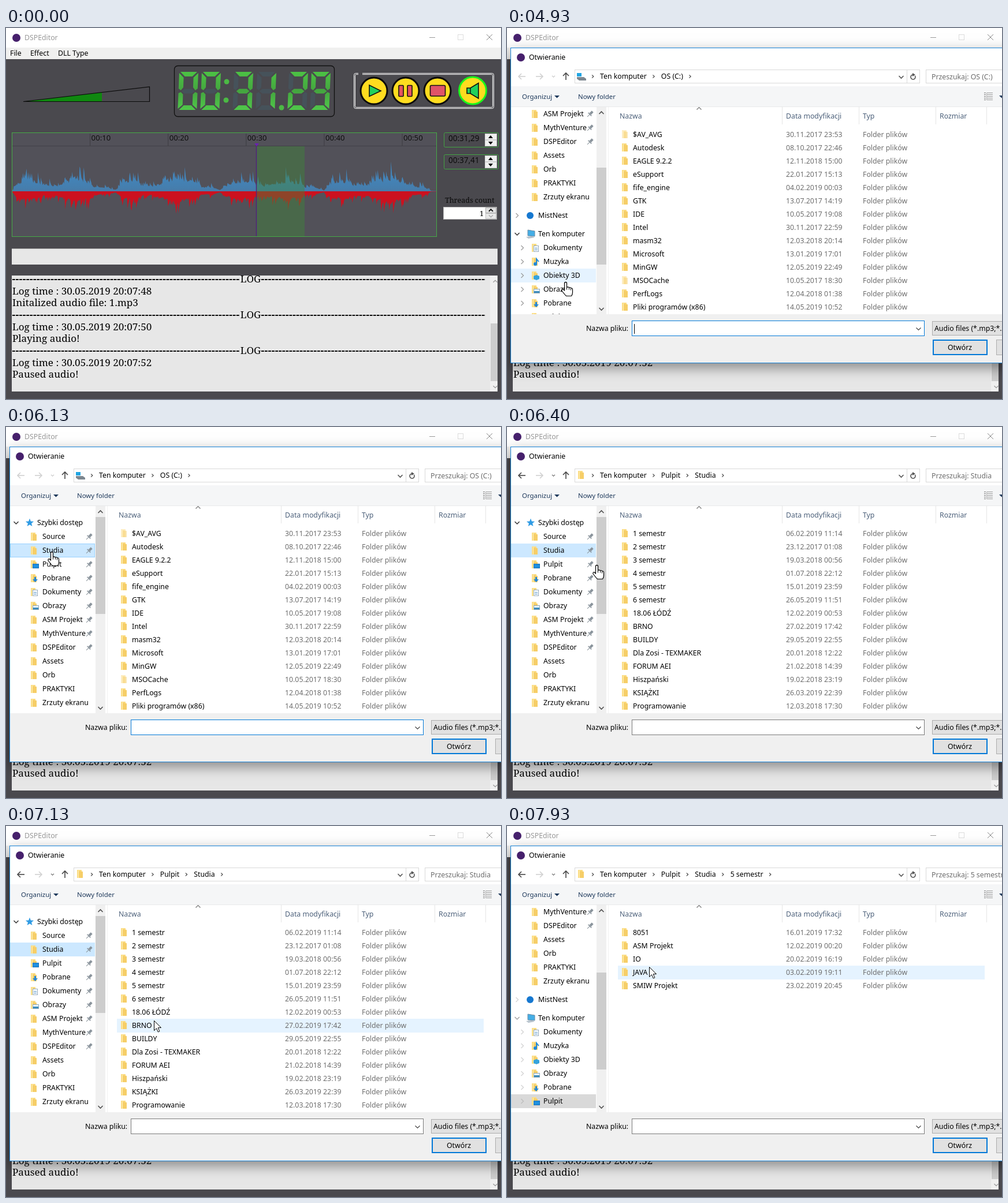
Animation, 857 px wide and 643 px high, one loop 8 s. Source, as an HTML page with a canvas:

```html
<!DOCTYPE html>
<html lang="pl">
<head>
<meta charset="utf-8">
<title>DSPEditor</title>
<style>
html, body { margin: 0; width: 100%; height: 100%; overflow: hidden; background: #4a494e; }
canvas { display: block; }
</style>
</head>
<body>
<canvas id="stage" width="857" height="643"></canvas>
<script>
const c = document.getElementById('stage').getContext('2d');
const SANS = '"Noto Sans", sans-serif', SERIF = '"Noto Serif", serif';
const BG = '#4a494e';

// ---------- helpers ----------
function rect(x, y, w, h, fill, stroke, lw = 1) {
  if (fill) { c.fillStyle = fill; c.fillRect(x, y, w, h); }
  if (stroke) {
    c.strokeStyle = stroke; c.lineWidth = lw;
    c.strokeRect(x + lw / 2, y + lw / 2, w - lw, h - lw);
  }
}
function rounded(x, y, w, h, r, fill, stroke, lw = 1) {
  c.beginPath(); c.roundRect(x, y, w, h, r);
  paint(fill, stroke, lw);
}
function paint(fill, stroke, lw = 1) {
  if (fill) { c.fillStyle = fill; c.fill(); }
  if (stroke) { c.strokeStyle = stroke; c.lineWidth = lw; c.stroke(); }
}
function poly(pts, fill, stroke, lw, open) {
  c.beginPath();
  for (let i = 0; i < pts.length; i += 2) c.lineTo(pts[i], pts[i + 1]);
  if (!open) c.closePath();
  paint(fill, stroke, lw);
}
const line = (pts, color, lw = 1) => poly(pts, null, color, lw, true);
function disc(x, y, r, fill, stroke, lw) {
  c.beginPath(); c.arc(x, y, r, 0, 7);
  paint(fill, stroke, lw);
}
// y is the middle of the capitals
function text(s, x, y, color = '#000', size = 12.3, family = SANS, align = 'left', weight = 400) {
  c.font = `${weight} ${size}px ${family}`;
  c.textAlign = align; c.fillStyle = color;
  c.fillText(s, x, Math.round(y + size * .36));
}
const logText = (s, x, y, align) => text(s, x, y, '#000', 17.1, SERIF, align, 500);
function chevron(x, y, dir, r, color, lw = 1.2) {
  c.save(); c.translate(x, y); c.rotate('rdlu'.indexOf(dir) * Math.PI / 2);
  line([-r / 2, -r, r / 2, 0, -r / 2, r], color, lw);
  c.restore();
}
function clip(x, y, w, h, draw) {
  c.save(); c.beginPath(); c.rect(x, y, w, h); c.clip();
  draw(); c.restore();
}

// ---------- main window ----------
const SEGMENTS = [
  [2, 0, 31, 0, 23, 8, 10, 8], [33, 2, 33, 29, 29, 32, 25, 27, 25, 10],
  [33, 37, 33, 64, 25, 57, 25, 39, 29, 35], [2, 66, 31, 66, 23, 58, 10, 58],
  [0, 37, 0, 64, 8, 57, 8, 39, 4, 35], [0, 2, 0, 29, 4, 32, 8, 27, 8, 10],
  [5, 33.5, 10, 29.5, 23, 29.5, 28, 33.5, 23, 37.5, 10, 37.5]
];
const LIT = { 0: '012345', 1: '12', 2: '01346', 3: '01236', 9: '012356' };

function digit(n, x) {
  c.save(); c.transform(1, 0, -.04, 1, x + 1, 76);
  SEGMENTS.forEach((s, i) => poly(s, LIT[n].includes(i) ? green : '#46525a'));
  c.restore();
}
const green = c.createLinearGradient(0, 0, 0, 66);
green.addColorStop(0, '#4cc244'); green.addColorStop(.5, '#44a53f'); green.addColorStop(1, '#50c84a');

// waveform envelope: x, height
const ENVELOPE = [11, 8, 20, 40, 50, 40, 65, 23, 92, 26, 108, 46, 122, 51, 145, 38, 152, 20,
  178, 15, 190, 4, 202, 38, 228, 42, 236, 22, 256, 22, 275, 44, 292, 50, 325, 40, 338, 19,
  358, 17, 370, 6, 380, 26, 396, 40, 426, 38, 440, 22, 465, 36, 488, 45, 508, 36, 518, 18,
  536, 18, 550, 4, 560, 32, 588, 43, 602, 24, 625, 28, 640, 44, 670, 53, 690, 42, 700, 22,
  724, 19, 736, 1, 746, 1];
let seed = 11;
const random = () => (seed = seed * 16807 % 2147483647) / 2147483647;
function envelope(x) {
  let i = 0;
  while (ENVELOPE[i + 2] < x) i += 2;
  const [x0, h0, x1, h1] = ENVELOPE.slice(i, i + 4);
  return h0 + (h1 - h0) * (x - x0) / (x1 - x0);
}
// a steady body with sparse spikes that fall off quickly
function wave(sign, scale) {
  const p = new Path2D();
  let spike = 0;
  p.moveTo(11, 283);
  for (let x = 11; x < 745; x++) {
    spike = Math.max(spike * .6, random() ** 6);
    const h = envelope(x) * scale * (.28 + .1 * random() + .62 * spike);
    p.lineTo(x + .5, 283 - sign * Math.max(h, .5));
  }
  p.lineTo(745, 283);
  return p;
}
const upper = wave(1, 1), lower = wave(-1, .85);

function spinner(y, value) {
  rounded(758.5, y + .5, 94, 25, 2, null, '#43a443');
  text(value, 766, y + 10.5, '#0c0c0c', 13.5);
  rect(829, y + 2, 21, 11, '#f0f0f0', '#cfcfcf');
  rect(829, y + 13, 21, 11, '#f0f0f0', '#cfcfcf');
  poly([835, y + 10, 843, y + 10, 839, y + 5], '#000');
  poly([835, y + 16, 843, y + 16, 839, y + 21], '#000');
}

function mainWindow() {
  rect(0, 0, 857, 643, BG);
  rect(0, 0, 857, 34, '#fff');
  rect(0, 34, 857, 20, '#f0f0ef');
  disc(18, 17, 7, '#46206c');
  text('DSPEditor', 32, 17, '#999');
  line([733, 16.5, 743, 16.5], '#999');
  rect(782, 11, 10, 10, null, '#ddd');
  line([832, 11, 842, 21], '#888'); line([842, 11, 832, 21], '#888');
  text('File', 7, 44); text('Effect', 42, 44); text('DLL Type', 90, 44);

  // volume
  poly([30, 127.5, 166, 111.5, 166, 127.5], '#108810');
  poly([30, 127.5, 248.5, 102, 248.5, 127.5], null, '#0a0a0a', 1.2);

  // clock
  rounded(291.5, 65.5, 277, 88, 6, null, '#101010', 1.3);
  [[0, 299], [0, 338], [3, 394], [1, 434], [2, 489], [9, 528]].forEach(d => digit(...d));
  for (const [x, y] of [[382, 93], [381, 125], [477, 138]]) disc(x, y, 4.5, '#4bb944');

  // transport buttons
  rounded(602.5, 78.5, 242, 61, 3, null, '#fff');
  rounded(604.5, 80.5, 238, 57, 2, null, '#fff');
  rect(610, 78, 7, 4, BG);
  for (const x of [637, 692, 747]) disc(x, 109, 23, '#ffdc1f', '#0b0b0b', 3);
  disc(808, 108.5, 23.5, '#ffdc1f', '#1bf51b', 3);
  poly([629, 99, 629, 118.5, 649, 109], '#22d15c', '#111', 1.6);
  rounded(680, 99.5, 8, 19, 1, '#e5535f', '#111', 1.6);
  rounded(695, 99.5, 8, 19, 1, '#e5535f', '#111', 1.6);
  rounded(734.5, 99.5, 26, 18.5, 2, '#e05468', '#111', 1.6);
  poly([798, 104, 804, 104, 818, 95.5, 818, 122, 804, 113.5, 798, 113.5], '#22d15c', '#111', 1.6);
  line([804, 104, 804, 113.5], '#111', 1.4);

  // waveform
  rect(10, 181, 736, 181, '#525159', '#46aa46');
  line([11, 204.5, 745, 204.5], '#414047');
  for (let i = 1; i < 6; i++) {
    const x = 10.5 + i * 135.1;
    line([x, 183, x, 204], '#3d3c42');
    text(`00:${i}0`, x + 2, 190.5, '#101010', 13.2);
  }
  const blue = c.createLinearGradient(0, 232, 0, 283);
  blue.addColorStop(0, '#3f8cc8'); blue.addColorStop(1, '#467caa');
  c.fillStyle = blue; c.fill(upper);
  c.fillStyle = '#cc111f'; c.fill(lower);
  rect(434, 205, 83, 156, 'rgba(60,135,55,.43)');
  line([433.5, 202, 433.5, 361], '#52207e', 1.4);
  poly([430, 200, 438, 200, 434, 205], '#6a20b4');

  // numeric inputs
  spinner(181, '00:31,29'); spinner(219, '00:37,41');
  text('Threads count', 760, 298, '#0a0a0a', 12.5, SERIF);
  rect(757, 310, 93, 22, '#fff', '#b5b5b5');
  text('1', 827, 321.5, '#000', 12.5, SERIF, 'right');
  rect(830, 311, 19, 10, '#e1e1e1', '#adadad');
  rect(830, 321, 19, 10, '#e8e8e8', '#c4c4c4');
  chevron(839.5, 316, 'u', 3.5, '#111', 1.8);
  chevron(839.5, 326, 'd', 3.5, '#aaa', 1.4);

  // input and log
  rect(10, 382, 841, 28, '#e7e7e7');
  rect(10, 382, 841, 1, '#a0a0a0');
  rect(10, 429, 841, 201, '#e7e7e7');
  clip(10, 429, 828, 201, () => {
    const entries = ['48|Initalized audio file: 1.mp3', '50|Playing audio!', '52|Paused audio!'];
    entries.forEach((entry, i) => {
      const [sec, msg] = entry.split('|'), y = 435 + i * 62;
      c.setLineDash([4.7, 1.36]);
      line([11, y + 1, 405, y + 1], '#000', 1.8);
      line([442, y + 1, 830, y + 1], '#000', 1.8);
      c.setLineDash([]);
      logText('LOG', 423.5, y, 'center');
      logText('Log time : 30.05.2019 20:07:' + sec, 11, y + 20.5);
      logText(msg, 11, y + 41.3);
    });
  });
  rect(838, 429, 13, 201, '#f0f0f0');
  rect(839, 512, 12, 100, '#cdcdcd');
  chevron(847, 439, 'u', 3.5, '#999'); chevron(847, 622, 'd', 3.5, '#999');
}

// ---------- file dialog ----------
const PLACES = [
  { path: ['Ten komputer', 'OS (C:)'], rows: `$AV_AVG|30.11.2017 23:53
Autodesk|08.10.2017 22:46
EAGLE 9.2.2|12.11.2018 15:00
eSupport|22.01.2017 15:13
fife_engine|04.02.2019 00:03
GTK|13.07.2017 14:19
IDE|10.05.2017 19:08
Intel|30.11.2017 22:59
masm32|12.03.2018 20:14
Microsoft|13.01.2019 17:01
MinGW|12.05.2019 22:49
MSOCache|10.05.2017 18:30
PerfLogs|12.04.2018 01:38
Pliki programów (x86)|14.05.2019 10:52` },
  { path: ['Ten komputer', 'Pulpit', 'Studia'], rows: `1 semestr|06.02.2019 11:14
2 semestr|23.12.2017 01:08
3 semestr|19.03.2018 00:56
4 semestr|01.07.2018 22:12
5 semestr|15.01.2019 23:59
6 semestr|26.05.2019 11:51
18.06 ŁÓDŹ|12.02.2019 00:53
BRNO|27.02.2019 17:42
BUILDY|29.05.2019 22:55
Dla Zosi - TEXMAKER|20.01.2018 12:22
FORUM AEI|21.02.2018 14:39
Hiszpański|19.02.2018 23:19
KSIĄŻKI|26.03.2019 22:39
Programowanie|12.03.2018 17:30` },
  { path: ['Ten komputer', 'Pulpit', 'Studia', '5 semestr'], rows: `8051|16.01.2019 17:32
ASM Projekt|12.02.2019 00:20
IO|20.02.2019 16:19
JAVA|03.02.2019 19:11
SMIW Projekt|23.02.2019 20:45` }
];
for (const p of PLACES) p.rows = p.rows.split('\n').map(r => r.split('|'));

// Sidebar: roots start with "*"; y is the row centre when scrolled to the top
const TREE = ('*Szybki dostęp,Source,Studia,Pulpit,Pobrane,Dokumenty,Obrazy,ASM Projekt,MythVenture,' +
  'DSPEditor,Assets,Orb,PRAKTYKI,Zrzuty ekranu,*MistNest,*Ten komputer,Dokumenty,Muzyka,' +
  'Obiekty 3D,Obrazy,Pobrane,Pulpit').split(',').map((s, i) => ({
  name: s.replace('*', ''), root: s[0] === '*',
  y: 166 + 24 * i + (i > 13 ? 8 : 0) + (i > 14 ? 8 : 0)
}));
const STUDIA = 2, DESKTOP = 21, COMPUTER = 15;

function folder(x, y, pale) {
  c.globalAlpha = pale ? .5 : 1;
  rect(x, y - 7, 8, 14, '#fbdc83');
  poly([x + 3, y - 5, x + 10, y - 4, x + 10, y + 7, x + 3, y + 7], '#f6ce68');
  line([x + 2.5, y - 6, x + 2.5, y + 7], '#fff0b8');
  c.globalAlpha = 1;
}
const BADGES = {
  Pulpit: (x, y) => rect(x, y - 1, 11, 8, '#1e90e0', '#1670b8'),
  Pobrane: (x, y) => poly([x + 3, y - 2, x + 6, y - 2, x + 6, y + 2, x + 9, y + 2, x + 4.5, y + 7, x, y + 2, x + 3, y + 2], '#2486d6'),
  Dokumenty: (x, y) => { rect(x, y - 4, 9, 11, '#fff', '#93a9bd'); line([x + 2, y + .5, x + 7, y + .5], '#4a8cc4'); line([x + 2, y + 3.5, x + 7, y + 3.5], '#4a8cc4'); },
  Obrazy: (x, y) => { rect(x, y - 1, 11, 8, '#eaf5fd', '#8fa6b8'); rect(x + 1, y + 3, 9, 3, '#3c8dbd'); },
  Muzyka: (x, y) => { disc(x + 3, y + 4, 3, '#1e88dc'); line([x + 5, y + 4, x + 5, y - 5, x + 9, y], '#1e88dc', 2); },
  'Obiekty 3D': (x, y) => poly([x, y + 1, x + 5, y - 1, x + 10, y + 1, x + 10, y + 6, x + 5, y + 8, x, y + 6], '#35a3dc')
};
function rootIcon(i, y) {
  if (i === 0) {
    const star = [];
    for (let k = 0; k < 10; k++) {
      const r = k % 2 ? 3.2 : 7.5, a = k * Math.PI / 5 - Math.PI / 2;
      star.push(41 + r * Math.cos(a), y + r * Math.sin(a));
    }
    poly(star, '#2f9be4');
  } else if (i === COMPUTER) {
    poly([36, y - 7, 48, y - 5, 48, y + 4, 36, y + 3], '#45aee6', '#6d8ca4');
    poly([33, y + 5, 44, y + 4, 48, y + 6, 37, y + 8], '#b4c0ca');
  } else disc(40, y, 6, '#1678d0');
}
function pin(x, y) {
  c.save(); c.translate(x, y); c.rotate(Math.PI / 4);
  rect(-2, -6, 4, 6, '#8a949c'); rect(-4, 0, 8, 1.6, '#8a949c'); rect(-.5, 1, 1, 6, '#8a949c');
  c.restore();
}

function sidebar(s) {
  clip(7, 137, 168, 359, () => TREE.forEach((item, i) => {
    const y = item.y - Math.round(s.scroll);
    const hover = s.x < 154 && s.y >= y - 12 && s.y < y + 12;
    let fill = hover && '#e5f3ff', border = null;
    if (i === STUDIA && s.k >= 92) {
      fill = s.k < 110 ? '#cce8ff' : '#d9d9d9';
      border = hover && '#99d1ff';
    }
    if (i === DESKTOP && s.k >= 112) fill = '#d9d9d9';
    rect(7, y - 12, 147, 24, fill, border);
    c.globalAlpha = s.k > 112 ? Math.max(.45, 1 - (s.k - 112) * .08) : 1;
    if (item.root && i !== 14) chevron(17.5, y, 'd', 4, '#333', 1.5);
    else if (i >= 14) chevron(item.root ? 17.5 : 26.5, y, 'r', 4, '#999');
    c.globalAlpha = 1;
    if (item.root) rootIcon(i, y);
    else {
      folder(43, y);
      BADGES[item.name]?.(46, y);
    }
    text(item.name, item.root ? 54 : 63, y);
    if (i > 0 && i < 10) pin(144, y);
  }));
  rect(155, 137, 17, 359, '#f0f0f0');
  rect(155, 156 + Math.round(s.scroll * .467), 17, 168, '#cdcdcd');
  chevron(163.5, 147, 'u', 4, '#505050', 1.6);
  chevron(163.5, 487, 'd', 4, '#505050', 1.6);
  line([175.5, 137, 175.5, 496], '#f2f2f2');
}

function arrow(x, y, dir, color) {
  c.save(); c.translate(x, y); c.rotate(dir);
  line([6, 0, -6, 0], color, 1.6); line([-1, -5, -6, 0, -1, 5], color, 1.6);
  c.restore();
}

function addressBar(place) {
  const first = place === PLACES[0];
  arrow(26, 84, 0, first ? '#d0d0d0' : '#444');
  arrow(56, 84, Math.PI, '#d0d0d0');
  chevron(80.5, 84, 'd', 2.5, first ? '#ccc' : '#777');
  arrow(102, 84, Math.PI / 2, '#444');
  rect(117, 72, 576, 24, '#fff', '#d9d9d9');
  rect(692, 72, 23, 24, '#fff', '#d9d9d9');
  rect(725, 72, 150, 24, '#fff', '#d9d9d9');
  if (first) {
    rect(121, 78, 8, 6, '#20a5e2');
    poly([121, 85, 133, 85, 137, 88, 137, 91, 125, 91, 121, 88], '#7d8790');
  } else folder(123, 83);
  chevron(148.5, 84, 'r', 2.7, '#444');
  let x = 161;
  for (const name of place.path) {
    text(name, x, 84);
    x += c.measureText(name).width + 12;
    chevron(x, 84, 'r', 2.7, '#444');
    x += 13;
  }
  chevron(682.5, 85, 'd', 4, '#555', 1.6);
  c.beginPath(); c.arc(703, 85, 4, -.6, 4.6);
  paint(null, '#555', 1.6);
  poly([702, 78, 707, 81, 702, 84], '#555');
  text('Przeszukaj: ' + place.path.at(-1), 735, 84.5, '#6d6d6d');
}

function fileList(s, place) {
  const head = '#4c607a';
  text('Nazwa', 195, 152.5, head); text('Data modyfikacji', 483, 152.5, head);
  text('Typ', 616, 152.5, head); text('Rozmiar', 749, 152.5, head);
  for (const x of [476.5, 609.5, 742.5, 830.5]) line([x, 137, x, 167], '#e5e5e5');
  chevron(332.5, 139.5, 'u', 4, '#777');
  const inside = s.x > 192 && s.x < 827;
  const hovered = inside ? Math.floor((s.y - 173) / 23) : -1;
  place.rows.forEach(([name, date], i) => {
    const y = 185 + 23 * i, chosen = place === PLACES[1] && i === 4 && s.k >= 110;
    if (chosen) rect(192, y - 12, 635, 24, '#cce8ff', '#99d1ff');
    else if (i === hovered) rect(192, y - 12, 635, 24, '#e5f3ff');
    folder(199, y - 1, name === '$AV_AVG' || name === 'MSOCache');
    text(name, 218, y);
    text(date, 483, y, '#6d6d6d');
    text('Folder plików', 616, y, '#6d6d6d');
  });
}

function dialog(s) {
  const place = PLACES[s.k < 95 ? 0 : s.k < 114 ? 1 : 2];
  c.save();
  c.shadowColor = 'rgba(0,0,0,.42)'; c.shadowBlur = 22; c.shadowOffsetY = 8;
  rect(6, 34, 900, 547, '#fff');
  c.restore();
  rect(6, 34, 900, 547, '#fff', '#1883d7');
  disc(24, 51, 7, '#46206c');
  text('Otwieranie', 38, 51);
  addressBar(place);

  rect(7, 101, 850, 36, '#f5f6f7');
  line([7, 136.5, 857, 136.5], '#e8e9ea');
  text('Organizuj', 26, 118.5, '#1e395b', 11.4);
  text('Nowy folder', 123, 118.5, '#1e395b', 11.4);
  poly([82, 117, 91, 117, 86.5, 121.5], '#1e395b');
  for (let y = 112.5; y < 126; y += 3) {
    line([826, y, 829, y], '#777'); line([831, y, 841, y], '#999');
  }
  line([830.5, 112, 830.5, 125], '#bbb');
  poly([852, 117, 861, 117, 856.5, 121.5], '#1e395b');

  fileList(s, place);
  sidebar(s);

  rect(7, 496, 850, 84, '#f0f0f0');
  text('Nazwa pliku:', 137, 521);
  rect(216, 507, 507, 27, '#fff', place === PLACES[0] ? '#0078d7' : '#7a7a7a');
  if (s.k < 82) line([220.5, 513, 220.5, 530], '#000');
  chevron(712.5, 521.5, 'd', 4, '#444');
  rect(736, 508, 150, 25, '#e1e1e1', '#adadad');
  text('Audio files (*.mp3;*.wav)', 740, 521);
  rect(737, 540, 95, 27, '#e1e1e1', '#0078d7', 2);
  text('Otwórz', 784, 554, '#000', 12.3, SANS, 'center');
  rect(847, 540, 90, 27, '#e1e1e1', '#adadad');
}

// ---------- pointer and time ----------
const POINTER = [0, 0, 0, 17, 4, 13.2, 6.8, 19.5, 9.4, 18.3, 6.7, 12.2, 12, 12];
const HAND = new Path2D('M-2 1Q0-1 2 1V9Q4 7.500 6 9.500Q8 8.500 9.500 10.500Q12 10 12 13V18Q12 21 10 24H1Q-2 21-6.500 15Q-7 12-4.500 12L-2 14.500Z');

function pointer(x, y) {
  c.save(); c.translate(Math.round(x) + .5, Math.round(y) + .5);
  c.lineJoin = 'round';
  if (x < 155) {
    c.fillStyle = '#fff'; c.fill(HAND);
    c.strokeStyle = '#000'; c.lineWidth = 1.2; c.stroke(HAND);
    line([2, 9, 2, 13], '#000'); line([6, 10, 6, 13], '#000'); line([9, 11, 9, 14], '#000');
  } else poly(POINTER, '#fff', '#000');
  c.restore();
}

// tick, pointer x, pointer y, sidebar scroll
const KEYS = [[1, 845, 627, 185], [2, 707, 524, 185], [73, 707, 524, 185], [74, 101, 440, 185],
  [77, 101, 440, 185], [84, 97, 385, 0], [90, 79, 216, 0], [93, 79, 216, 0], [101, 281, 276, 0],
  [106, 258, 356, 0], [110, 249, 279, 0], [111, 249, 279, 0], [112, 249, 279, 209],
  [119, 246, 244, 209], [120, 246, 244, 209]];

function stateAt(k) {
  const i = Math.max(1, KEYS.findIndex(key => key[0] >= k));
  const a = KEYS[i - 1], b = KEYS[i], f = (k - a[0]) / (b[0] - a[0]);
  const [x, y, scroll] = [1, 2, 3].map(n => a[n] + (b[n] - a[n]) * f);
  return { k, x, y, scroll };
}

function frame(now) {
  const k = Math.floor(now % 8000 * .015 + .06); // 15 ticks per second
  const s = stateAt(k);
  mainWindow();
  if (k >= 74) dialog(s);
  if (k >= 1) pointer(s.x, s.y);
  requestAnimationFrame(frame);
}
requestAnimationFrame(frame);
</script>
</body>
</html>
```
